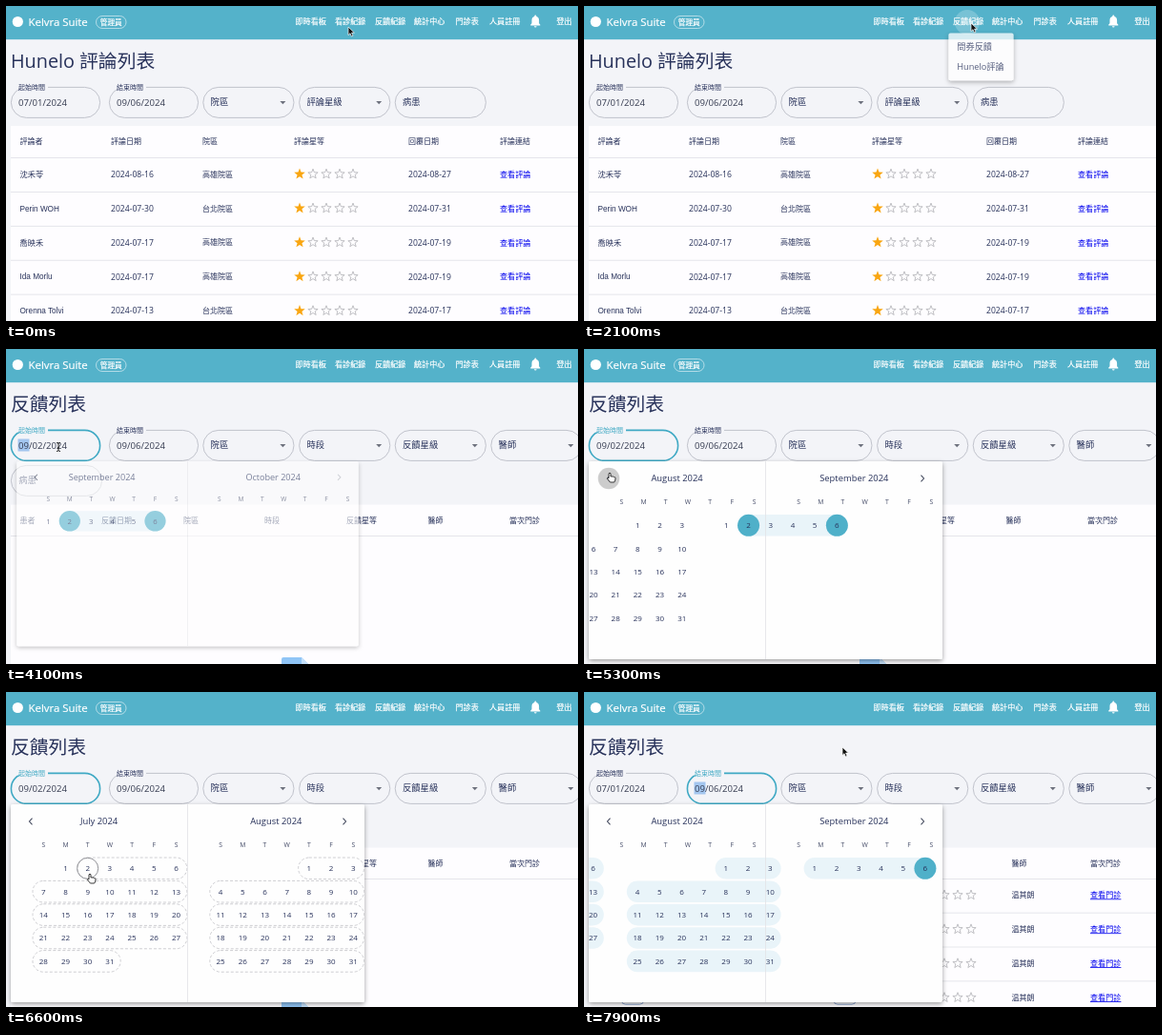
Recreate the animation shown at these times as an HTML page. Size 600 by 331 pixels, loop 8000 ms.

```html
<!DOCTYPE html>
<html lang="zh-Hant">
<head>
<meta charset="utf-8">
<title>反饋列表</title>
<style>
  html, body { margin: 0; width: 100%; height: 100%; overflow: hidden; background: #f3f4f8; }
  svg { display: block; width: 100vw; height: 100vh; }
  text { font-family: "Open Sans", "Noto Sans CJK TC", "Noto Sans CJK", sans-serif; }
  #bar text { stroke: #fff; stroke-width: .22; }
</style>
</head>
<body>
<svg id="stage" viewBox="0 0 600 331">
  <defs>
    <filter id="shadow" x="-10%" y="-10%" width="120%" height="130%">
      <feDropShadow dx="0" dy="2" stdDeviation="2.5" flood-color="#000" flood-opacity=".38"/>
    </filter>
    <clipPath id="paper"><rect x="5" y="118" width="371" height="208" rx="2"/></clipPath>
  </defs>
  <rect width="600" height="331" fill="#f3f4f8"/>
  <g id="reviews"></g>
  <g id="feedback"><g id="empty"></g><g id="results"></g></g>
  <g id="fields"></g>
  <g id="bar"></g>
  <g id="ripple"></g>
  <g id="menu"></g>
  <g id="picker"></g>
  <g id="cursor"></g>
</svg>
<script>
const LOOP = 8000;
const INK = '#27315a', TEAL = '#54b2ca', FOCUS = '#3fa9c4', BAND = '#e9f4f9', LINE = '#dfe0e6';
const $ = id => document.getElementById(id);

// Times of the user's actions
const T = { menuOpen: 2000, navigate: 2800, pickerOpen: 3990, prev1: 5200, prev2: 5700, pick: 7600, next: 7700, loaded: 7750 };

// Drawing helpers
const text = (s, x, y, size = 8, fill = INK, extra = '') =>
  `<text x="${x}" y="${y + size * .36}" font-size="${size}" fill="${fill}" ${extra}>${s}</text>`;
const centred = (s, x, y, size, fill) => text(s, x, y, size, fill, 'text-anchor="middle"');
const rect = (x, y, w, h, fill, extra = '') =>
  `<rect x="${x}" y="${y}" width="${w}" height="${h}" fill="${fill}" ${extra}/>`;
const circle = (x, y, r, fill, extra = '') => `<circle cx="${x}" cy="${y}" r="${r}" fill="${fill}" ${extra}/>`;
const path = (d, fill, extra = '') => `<path d="${d}" fill="${fill}" ${extra}/>`;
const rule = y => rect(5, y, 595, .8, LINE);

function star(x, y, on) {
  const r = on ? 6.1 : 5.4;
  const points = Array.from({ length: 10 }, (_, i) => {
    const a = (i / 5 - .5) * Math.PI, q = i % 2 ? r * .42 : r;
    return (x + q * Math.cos(a)).toFixed(2) + ',' + (y + .4 + q * Math.sin(a)).toFixed(2);
  });
  return `<polygon points="${points.join(' ')}" ${on ? 'fill="#f9a611"' : 'fill="none" stroke="#b9b9be" stroke-width=".9"'}/>`;
}
const stars = (x, y, n) => [0, 1, 2, 3, 4].map(i => star(x + i * 14, y, i < n)).join('');

// Easing
function bezier(x1, y1, x2, y2) {
  const at = (a, b, s) => 3 * (1 - s) ** 2 * s * a + 3 * (1 - s) * s * s * b + s ** 3;
  return p => {
    if (p <= 0) return 0;
    if (p >= 1) return 1;
    let lo = 0, hi = 1;
    for (let i = 0; i < 20; i++) {
      const mid = (lo + hi) / 2;
      if (at(x1, x2, mid) < p) lo = mid; else hi = mid;
    }
    return at(y1, y2, lo);
  };
}
const standard = bezier(.4, 0, .2, 1), slide = bezier(.35, .8, .4, 1);

function grow(el, age, duration, ox, oy) {
  const k = .75 + .25 * standard(age / (duration * .666));
  el.setAttribute('opacity', standard(age / duration));
  el.setAttribute('transform', `translate(${ox} ${oy}) scale(${k} ${k * k}) translate(${-ox} ${-oy})`);
}

// Form fields
function pill(x, y, w, border = '#b4b7c0', weight = .8) {
  return rect(x + .4, y + .4, w - .8, 32, 'none', `rx="16" stroke="${border}" stroke-width="${weight}"`);
}
function dateField(x, label, value, { focus, hover, marked }) {
  const border = focus ? FOCUS : hover ? '#262b3c' : undefined;
  return pill(x, 85, 94, border, focus ? 1.6 : hover ? 1 : .8) +
    rect(x + 5, 83, 34, 4.5, '#f3f4f8') +
    text(label, x + 8, 85, 7, focus ? FOCUS : INK) +
    (marked ? rect(x + 7.5, 94.5, 12, 13, '#a3c6ef') : '') +
    text(value, x + 8, 101.3, 9.6, '#353b50');
}
const select = (x, label) => pill(x, 85, 96) + text(label, x + 8.2, 101, 9.3) +
  path(`M${x + 81} 100h6l-3 3.2z`, '#6d717d');
const input = (x, y, label) => pill(x, y, 96) + text(label, x + 8.2, y + 16, 9.3);

// Static parts
function drawBar() {
  const nav = [['即時看板', 303.5], ['看診紀錄', 345], ['反饋紀錄', 387], ['統計中心', 428], ['門診表', 471.5], ['人員註冊', 507], ['登出', 577.5]];
  $('bar').innerHTML = rect(0, 0, 600, 35.2, TEAL) +
    circle(12.3, 16.5, 5.6, '#fff') + text('Kelvra Suite', 23.5, 17, 11.4, '#fff') +
    rect(94.5, 10.5, 31.5, 13, 'none', 'rx="6.5" stroke="#c9e6ee" stroke-width=".8"') +
    centred('管理員', 110.2, 16.8, 7.6, '#fff') +
    nav.map(([s, x]) => text(s, x, 16.5, 8.1, '#fff')).join('') +
    path('M550.3 20.5v-1l1.2-1.2v-3.4c0-2 1.1-3.4 2.8-3.8v-.5a1 1 0 0 1 2 0v.5c1.7.4 2.8 1.8 2.8 3.8v3.4l1.2 1.2v1zM554 21.3h2.6a1.3 1.3 0 0 1-2.6 0z', '#fff');
}

function drawReviews() {
  const cols = [14.5, 110, 206, 302, 422, 518];
  const heads = ['評論者', '評論日期', '院區', '評論星等', '回覆日期', '評論連結'];
  const rows = [
    ['沈禾苓', '08-16', '高雄', '08-27'], ['Perin WOH', '07-30', '台北', '07-31'],
    ['喬映禾', '07-17', '高雄', '07-19'], ['Ida Morlu', '07-17', '高雄', '07-19'],
    ['Orenna Tolvi', '07-13', '台北', '07-17']
  ];
  $('reviews').innerHTML = text('Hunelo 評論列表', 5, 58, 19.8) +
    rect(5, 126, 595, 205, '#fefdff') + rule(159) +
    heads.map((s, i) => text(s, cols[i], 142.5)).join('') +
    rows.map(([name, date, place, reply], i) => {
      const y = 176.8 + i * 35.9;
      return text(name, cols[0], y, 8.2, INK, 'style="font-family:\'Liberation Sans\',\'Noto Sans CJK TC\',sans-serif"') +
        text('2024-' + date, cols[1], y, 8.6) + text(place + '院區', cols[2], y) +
        stars(308, y - .6, 1) + text('2024-' + reply, cols[4], y, 8.6) +
        text('查看評論', cols[5], y, 8.1, '#00e') + rule(y + 18.2);
    }).join('');
}

function drawFeedback() {
  const heads = ['患者', '反饋日期', '院區', '時段', '反饋星等', '醫師', '當次門診'];
  const table = xs => rect(5, 163.5, 595, 168, '#fefdff') + rule(196) +
    heads.map((s, i) => text(s, xs[i], 180)).join('');
  $('empty').innerHTML = table([14.5, 100, 186, 271, 357, 442.5, 528]) +
    path('M289 331v-5q0-2 2-2h19l9 9z', '#90c5f6') + path('M310 324l9 9h-9z', '#c5e1fb');
  $('results').innerHTML = table([14.5, 100, 186, 271, 344, 448.5, 531]) +
    [0, 2, 1, 1].map((n, i) => {
      const y = 213.5 + i * 35.9;
      return [39.5, 262].map(x => rect(x, y - 7, 23, 14, 'none', 'rx="4" stroke="#6f8fc4" stroke-width=".8"')).join('') +
        stars(350, y - .5, n) + text('温其朗', 448.5, y) +
        text('查看門診', 531, y, 8.1, '#00e', 'text-decoration="underline"') + rule(y + 18.2);
    }).join('');
}

function drawMenu() {
  $('menu').innerHTML = rect(382, 28.5, 69, 51, '#fff', 'rx="2" filter="url(#shadow)"') +
    text('問券反饋', 391, 43.4, 9.3) + text('Hunelo評論', 391, 64.8, 9.3);
}

// Calendar: months sit side by side on a strip that slides under fixed headings
const MONTHS = ['', '', '', '', '', '', 'July', 'August', 'September', 'October', 'November'];
const PITCH = 185.8, COL = 23.2, ROW = 24.4, LAST = dayKey(8, 6);
function dayKey(month, day) { return month * 100 + day; }

function month(m, dx, range, hover) {
  const first = new Date(2024, m, 1).getDay(), count = new Date(2024, m + 1, 0).getDate();
  const place = d => {
    const n = first + d - 1;
    return { x: 39.3 + dx + (n % 7) * COL, y: 185.3 + Math.floor(n / 7) * ROW, col: n % 7 };
  };
  const bands = (from, to, style) => {
    let out = '', start = 0;
    for (let d = 1; d <= count; d++) {
      const key = dayKey(m, d);
      if (key < from || key > to) continue;
      start = start || d;
      if (place(d).col === 6 || d === count || key === to) {
        const a = place(start), b = place(d);
        out += `<rect x="${a.x - 11.3}" y="${a.y - 11.3}" width="${b.x - a.x + 22.6}" height="22.6" rx="11.3" ${style}/>`;
        start = 0;
      }
    }
    return out;
  };
  let out = bands(range[0], range[1], `fill="${BAND}"`);
  if (hover) out += bands(hover, range[0], 'fill="none" stroke="#c9c9cd" stroke-width=".9" stroke-dasharray="3 2"');
  for (let d = 1; d <= count && dayKey(m, d) <= LAST; d++) {
    const { x, y } = place(d), key = dayKey(m, d);
    if (range.includes(key)) out += circle(x, y, 11.5, '#4fb0c9');
    if (key === hover) out += circle(x, y, 11, '#fefefe', 'stroke="#85868c" stroke-width=".9"');
    out += centred(d, x, y, 8, INK);
  }
  return out;
}

function hoveredDay(m, p) {
  const col = Math.round((p.x - 39.3) / COL), row = Math.round((p.y - 188) / ROW);
  const day = row * 7 + col - new Date(2024, m, 1).getDay() + 1;
  return col >= 0 && col < 7 && row >= 0 && day > 0 && day < 32 ? dayKey(m, day) : 0;
}

const chevron = (x, dir, fill) =>
  path(`M${x - dir * 1.5} 132.7l${dir * 3} 3.3l${-dir * 3} 3.3`, 'none', `stroke="${fill}" stroke-width="1.1"`);

function drawPicker(t, mouse) {
  const step = start => slide((t - start) / 375);
  const view = 8 - step(T.prev1) - step(T.prev2) + step(T.next);
  const left = 8 - (t >= T.prev1) - (t >= T.prev2) + (t >= T.next);
  const range = [t < T.pick ? dayKey(8, 2) : dayKey(6, 1), LAST];
  const hover = view === 6 && t < T.pick ? hoveredDay(6, mouse) : 0;
  const overArrow = Math.hypot(mouse.x - 26, mouse.y - 134) < 11;
  const pressed = Math.max(...[T.prev1, T.prev2].map(s => t >= s && t < s + 400 ? 1 - (t - s) / 400 : 0));

  let strip = '';
  for (let m = Math.floor(view); m <= Math.floor(view) + 2; m++) strip += month(m, (m - view) * PITCH, range, hover);
  const panels = [0, 1].map(i => centred(MONTHS[left + i] + ' 2024', 97.5 + i * PITCH, 136, 9.4, INK) +
    [...'SMTWTFS'].map((s, c) => centred(s, 39.3 + i * PITCH + c * COL, 161, 6.8, '#454c68')).join('')).join('');

  $('picker').innerHTML = rect(5, 118, 371, 208, '#fefefe', 'rx="2" filter="url(#shadow)"') +
    `<g clip-path="url(#paper)">${strip}</g>` + rect(190, 118, .8, 208, '#e3e3e6') + panels +
    (overArrow ? circle(26, 136, 11.3, '#000', `opacity="${.06 + .18 * pressed}"`) : '') +
    chevron(26, -1, '#444a5e') + chevron(355, 1, left === 8 ? '#b9bbc2' : '#444a5e');
}

// Pointer
const TRACK = [
  [0, 359, 22], [1200, 362, 21], [1800, 406, 18], [2150, 406, 18], [2550, 409, 42], [2800, 409, 42],
  [3200, 126, 92], [3700, 55, 103], [4300, 55, 103], [5000, 27, 130], [5900, 27, 130],
  [6500, 88, 191], [6750, 88, 191], [7250, 64, 189], [7600, 64, 189], [7870, 271, 58]
];
function pointer(t) {
  const i = TRACK.findIndex(k => k[0] > t);
  if (i < 0) { const [, x, y] = TRACK[TRACK.length - 1]; return { x, y }; }
  const [t0, x0, y0] = TRACK[i - 1], [t1, x1, y1] = TRACK[i];
  const p = (t - t0) / (t1 - t0), e = p * p * (3 - 2 * p);
  return { x: x0 + (x1 - x0) * e, y: y0 + (y1 - y0) * e };
}
const CURSORS = {
  arrow: path('M0 0v8.6l2-1.9 1.4 3.2 1.6-.7-1.4-3.1h2.8z', '#111', 'stroke="#fff" stroke-width=".7"'),
  beam: path('M-2-4.5q2 0 2 1.2v6.6q0 1.2-2 1.2M2-4.5q-2 0-2 1.2M2 4.5q-2 0-2-1.2M-1.2 1h2.4', 'none', 'stroke="#222" stroke-width="1"'),
  hand: path('M-1 .8q1-1.3 2 0v3.2q1.2-.7 1.8.2 1.2-.5 1.7.4 1.5-.3 1.5 1.2 0 2.4-1.3 4.2h-4.3q-1.2-1.7-3-3.6 0-1.4 1.6-.6z', '#fff', 'stroke="#222" stroke-width=".9"')
};

function render(t) {
  const mouse = pointer(t), onFeedback = t >= T.navigate, open = t >= T.pickerOpen;
  $('reviews').style.display = onFeedback ? 'none' : '';
  $('feedback').style.display = onFeedback ? '' : 'none';
  $('empty').style.display = t < T.loaded ? '' : 'none';
  $('results').style.display = t < T.loaded ? 'none' : '';

  const picked = t >= T.pick;
  const start = !onFeedback || picked ? '07/01/2024' : '09/02/2024';
  const over = x => onFeedback && mouse.x > x && mouse.x < x + 94 && mouse.y > 85 && mouse.y < 117;
  $('fields').innerHTML =
    dateField(5, '起始時間', start, { focus: open && !picked, hover: over(5), marked: open && t < T.prev1 }) +
    dateField(108, '結束時間', '09/06/2024', { focus: picked, hover: over(108), marked: picked }) +
    select(206.4, '院區') +
    (onFeedback
      ? text('反饋列表', 5, 58, 19.8) + select(307.2, '時段') + select(407.8, '反饋星級') + select(508.4, '醫師') + input(5, 122, '病患')
      : select(307.2, '評論星級') + input(407.8, 85, '病患'));

  const press = (t - T.menuOpen) / 550;
  $('ripple').innerHTML = press >= 0 && press < 1
    ? circle(402, 17, 13 * standard(Math.min(1, press * 5 + .3)), '#fff', `opacity="${.26 * (1 - press)}"`) : '';

  const menuOn = t >= T.menuOpen && t < T.navigate;
  $('menu').style.display = menuOn ? '' : 'none';
  if (menuOn) grow($('menu'), t - T.menuOpen, 207, 416.5, 28.5);

  $('picker').style.display = open ? '' : 'none';
  if (open) {
    drawPicker(t, mouse);
    grow($('picker'), t - T.pickerOpen, 284, 190.5, 118);
  }

  const shape = t >= 3120 && t < 4500 ? 'beam' : t >= 4800 && t < 7700 ? 'hand' : 'arrow';
  $('cursor').innerHTML = CURSORS[shape];
  $('cursor').setAttribute('transform', `translate(${mouse.x} ${mouse.y})`);
}

drawBar();
drawReviews();
drawFeedback();
drawMenu();
const begun = performance.now();
function tick() {
  render((performance.now() - begun) % LOOP);
  requestAnimationFrame(tick);
}
tick();
</script>
</body>
</html>
```
